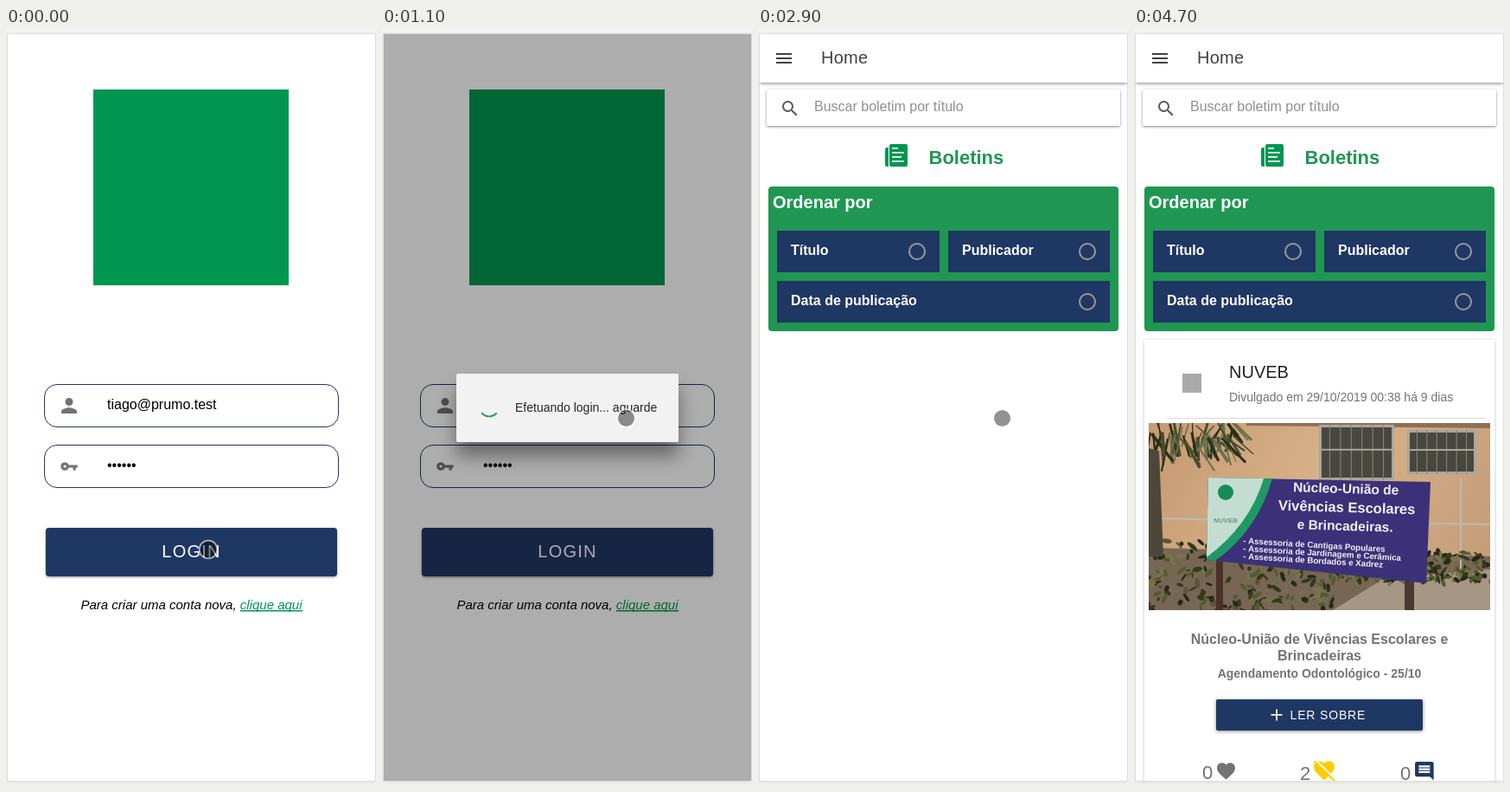
Animation, 428 px wide and 875 px high, one loop 5.9 s. Source, as an HTML page with a canvas:

```html
<!DOCTYPE html>
<html lang="pt">
<head>
<meta charset="utf-8">
<title>Login</title>
<style>
  html, body { margin: 0; width: 100%; height: 100%; overflow: hidden; background: #f4f4f4; }
  canvas { display: block; width: 428px; height: 875px; }
</style>
</head>
<body>
<canvas id="stage" width="428" height="875"></canvas>
<script>
const ctx = document.getElementById('stage').getContext('2d');
const LOOP = 5900, STEP = 100;
const NAVY = '#1f3763', GREEN = '#009650', PANEL = '#1f9752', GRAY = '#737373';
const SANS = '"Liberation Sans", Arial, sans-serif';

const ICONS = {
  person: 'M12 12a4.5 4.5 0 1 0 0-9 4.5 4.5 0 0 0 0 9zm0 2.25c-2.98 0-9 1.52-9 4.5V21h18v-2.25c0-2.98-6.02-4.5-9-4.5z',
  key: 'M11.68 10.5C11.02 8.62 9.1 7.13 6.98 7.13a4.8 4.8 0 0 0-4.73 4.87 4.86 4.86 0 0 0 4.83 4.87c2.11 0 3.94-1.49 4.6-3.37h4.82v3h3.24v-3h2.01v-3zM7.1 13.62a1.62 1.62 0 1 1 0-3.24 1.62 1.62 0 0 1 0 3.24z',
  menu: 'M3 6h18v2H3zM3 11h18v2H3zM3 16h18v2H3z',
  search: 'M15.5 14h-.79l-.28-.27A6.5 6.5 0 1 0 13.73 14.43l.27.28v.79l5 4.99L20.49 19zM9.5 14a4.5 4.5 0 1 1 0-9 4.5 4.5 0 0 1 0 9z',
  heart: 'M12 21.35l-1.45-1.32C5.4 15.36 2 12.28 2 8.5 2 5.42 4.42 3 7.5 3c1.74 0 3.41.81 4.5 2.09C13.09 3.81 14.76 3 16.5 3 19.58 3 22 5.42 22 8.5c0 3.78-3.4 6.86-8.55 11.54z',
  comment: 'M22 4c0-1.1-.9-2-2-2H4a2 2 0 0 0-2 2v12c0 1.1.9 2 2 2h14l4 4zM18 14H6v-2h12zM18 11H6V9h12zM18 8H6V6h12z'
};
for (const name in ICONS) ICONS[name] = new Path2D(ICONS[name]);

const clamp = v => Math.max(0, Math.min(1, v));
const smooth = v => (v = clamp(v), v * v * (3 - 2 * v));
const lerp = (a, b, k) => a + (b - a) * k;

function icon(name, x, y, scale, color) {
  ctx.save();
  ctx.translate(x, y);
  ctx.scale(scale, scale);
  ctx.fillStyle = color;
  ctx.fill(ICONS[name], 'evenodd');
  ctx.restore();
}

function text(str, x, y, size, color, { style = '', align = 'left', spacing = 0 } = {}) {
  ctx.font = `${style} ${size}px ${SANS}`;
  ctx.textAlign = align;
  ctx.letterSpacing = spacing + 'px';
  ctx.fillStyle = color;
  ctx.fillText(str, x, y);
}

// shadow: [offsetY, blur, alpha]; like a CSS shadow it never shows under the box itself
function box(x, y, w, h, r, color, shadow) {
  const shape = new Path2D();
  shape.roundRect(x, y, w, h, r);
  ctx.fillStyle = color;
  if (shadow) {
    const outside = new Path2D(shape);
    outside.rect(-100, -100, 700, 1100);
    ctx.save();
    ctx.clip(outside, 'evenodd');
    ctx.shadowOffsetY = shadow[0];
    ctx.shadowBlur = shadow[1];
    ctx.shadowColor = `rgba(0,0,0,${shadow[2]})`;
    ctx.fill(shape);
    ctx.restore();
  }
  ctx.fill(shape);
}

function poly(color, ...pts) {
  ctx.fillStyle = color;
  ctx.beginPath();
  for (let i = 0; i < pts.length; i += 2) ctx.lineTo(pts[i], pts[i + 1]);
  ctx.fill();
}

function line(color, width, x1, y1, x2, y2) {
  ctx.strokeStyle = color;
  ctx.lineWidth = width;
  ctx.beginPath();
  ctx.moveTo(x1, y1);
  ctx.lineTo(x2, y2);
  ctx.stroke();
}

function circle(x, y, r, fill, stroke, width) {
  ctx.beginPath();
  ctx.arc(x, y, r, 0, Math.PI * 2);
  if (fill) { ctx.fillStyle = fill; ctx.fill(); }
  if (stroke) { ctx.strokeStyle = stroke; ctx.lineWidth = width; ctx.stroke(); }
}

function page() {
  ctx.fillStyle = '#f4f4f4';
  ctx.fillRect(0, 0, 428, 875);
  box(1, 6, 427, 864, 1, '#dddddd', [1, 6, .1]);
  ctx.fillStyle = '#fff';
  ctx.fillRect(2, 7, 425, 862);
}

function field(y) {
  ctx.strokeStyle = NAVY;
  ctx.lineWidth = 1;
  ctx.beginPath();
  ctx.roundRect(44.5, y + .5, 340, 49, 14.5);
  ctx.stroke();
}

function loginButton(t) {
  const pressed = t >= 300 && t < 800;
  const fade = t > 500 ? clamp((800 - t) / 300) : 1;
  box(46, 577, 337, 56, 4, NAVY, pressed ? [1 + 2 * fade, 3 + 5 * fade, .45] : [1, 3, .45]);
  if (pressed) {
    ctx.save();
    ctx.beginPath();
    ctx.roundRect(46, 577, 337, 56, 4);
    ctx.clip();
    circle(Math.max(214.5, 232 - .15 * (t - 300)), 604, 95 + .69 * (t - 300), `rgba(255,255,255,${.155 * fade})`);
    ctx.restore();
  }
  text('LOGIN', 180.35, 611, 20, '#fff', { spacing: 1.2 });
}

function loginScreen(t) {
  box(101, 71, 226, 226, 0, GREEN);
  field(411);
  icon('person', 61, 424, 1, GRAY);
  text('tiago@prumo.test', 117, 440, 16, '#000');
  field(481);
  icon('key', 61, 494, 1, GRAY);
  text('••••••', 117, 510, 16, '#000');
  loginButton(t);
  text('Para criar uma conta nova, ', 86.5, 671, 15, '#000', { style: 'italic' });
  text('clique aqui', 270.8, 671, 15, GREEN, { style: 'italic' });
  ctx.fillRect(271, 672, 72, 1.5);
  if (t >= 300) loading(t);
}

function loading(t) {
  const shown = smooth((t - 205) / 280);
  ctx.fillStyle = `rgba(0,0,0,${.32 * shown})`;
  ctx.fillRect(2, 7, 425, 862);

  ctx.save();
  ctx.globalAlpha = shown;
  ctx.translate(214.5, 438.5);
  ctx.scale(1.1 - .1 * shown, 1.1 - .1 * shown);
  ctx.translate(-214.5, -438.5);
  box(86, 399, 257, 79, 2, '#f2f2f2', [16, 20, .4]);
  const start = (112 + .48 * (Math.min(t, 2400) - 500)) * Math.PI / 180;
  ctx.strokeStyle = '#1f9f5a';
  ctx.lineWidth = 1.9;
  ctx.beginPath();
  ctx.arc(124, 437, 11.4, start, start + 1.77);
  ctx.stroke();
  text('Efetuando login... aguarde', 154, 443, 14, '#262626');
  ctx.restore();
}

function option(label, x, y, w) {
  box(x, y, w, 48, 0, NAVY);
  text(label, x + 16, y + 28, 16, '#fff', { style: 'bold' });
  circle(x + w - 26, y + 24, 9, null, '#999', 2);
}

function paperIcon() {
  box(147, 138, 4, 22, [2, 0, 0, 2], GREEN);
  box(152, 134, 21, 26, 2, GREEN);
  [[139, 7], [144, 14], [149, 11], [154, 14]].forEach(([y, w]) => box(155, y - 1, w, 1.7, 0, '#fff'));
}

function homeScreen(t) {
  ctx.save();
  ctx.beginPath();
  ctx.rect(2, 7, 425, 862);
  ctx.clip();
  if (t >= 3300) card();
  box(2, 7, 425, 56, 0, '#fff', [1, 4, .5]);
  icon('menu', 18, 23, 1, '#424242');
  text('Home', 73, 41, 20, '#424242', { spacing: .25 });
  box(10, 71, 409, 42, 2, '#fff', [1, 3, .5]);
  icon('search', 25, 81, 1, '#5b5b5b');
  text('Buscar boletim por título', 65, 96, 16, '#8f8f8f');
  paperIcon();
  text('Boletins', 197.5, 157, 22, PANEL, { style: 'bold' });
  box(12, 183, 405, 167, 4, PANEL);
  text('Ordenar por', 17, 208, 20, '#fff', { style: 'bold' });
  option('Título', 22, 234, 188);
  option('Publicador', 220, 234, 187);
  option('Data de publicação', 22, 292, 385);
  if (t >= 3300 && t < 3900) box(421, 66, 3, 322, 1.5, `rgba(0,0,0,${t < 3600 ? .45 : .22})`);
  ctx.restore();
}

function card() {
  const bold = { style: 'bold', align: 'center' };
  box(12, 360, 405, 530, 3, '#fff', [1, 4, .25]);
  box(56, 399, 22, 22, 0, '#aaa');
  text('NUVEB', 110, 404, 20, '#222');
  text('Divulgado em 29/10/2019 00:38 há 9 dias', 110, 431, 14, GRAY);
  box(38, 450, 369, 1, 0, '#dadada');
  photo();
  text('Núcleo-União de Vivências Escolares e', 214.5, 711, 16, GRAY, bold);
  text('Brincadeiras', 214.5, 730, 16, GRAY, bold);
  text('Agendamento Odontológico - 25/10', 214.5, 750, 14, GRAY, bold);
  box(95, 775, 239, 36, 2, NAVY, [1, 4, .45]);
  box(158.5, 792, 13, 1.7, 0, '#fff');
  box(164.2, 786.4, 1.7, 13, 0, '#fff');
  text('LER SOBRE', 180.5, 798, 14, '#fff', { spacing: .84 });

  text('0', 79, 867, 22, GRAY);
  icon('heart', 93.9, 845.2, 1.05, GRAY);
  text('2', 192, 868, 22, GRAY);
  icon('heart', 205.6, 842.6, 1.2, '#ffcc00');
  line('#fff', 2.2, 210, 845, 235, 869);
  line('#ffcc00', 2, 208.5, 846.5, 232, 869);
  text('0', 308, 868, 22, GRAY);
  icon('comment', 322.9, 844.8, 1.08, NAVY);
}

function photo() {
  let seed = 7;
  const rnd = () => (seed = seed * 16807 % 2147483647) / 2147483647;
  ctx.save();
  ctx.beginPath();
  ctx.rect(17, 456, 395, 216);
  ctx.clip();

  const wall = ctx.createLinearGradient(17, 456, 412, 640);
  wall.addColorStop(0, '#c69a72');
  wall.addColorStop(.5, '#d9b28a');
  wall.addColorStop(1, '#c39b78');
  ctx.fillStyle = wall;
  ctx.fillRect(17, 456, 395, 216);
  poly('#8d7055', 130, 456, 412, 456, 412, 462, 130, 459);

  for (const [x, y, w, h] of [[214, 458, 87, 64], [316, 464, 80, 51]]) {
    box(x, y, w, h, 0, '#a9a69a');
    box(x + 3, y + 3, w - 6, h - 6, 0, '#48473f');
    for (let i = 1; i < 7; i++) line('#88877c', 1, x + i * w / 7, y, x + i * w / 7, y + h);
    line('#a9a69a', 2, x, y + h * .45, x + w, y + h * .45);
  }

  poly('#766653', 17, 600, 412, 610, 412, 672, 17, 672);
  poly('#a69784', 230, 672, 290, 635, 412, 625, 412, 672);
  line('#b9bbb1', 2, 17, 566, 412, 573);
  line('#b9bbb1', 2, 378, 520, 378, 625);

  for (let i = 0; i < 420; i++) {
    const x = 17 + rnd() * 395, edge = x < 90 ? 592 : x < 200 ? 617 : 605;
    const y = edge + rnd() * (x < 230 ? 80 : 34);
    ctx.fillStyle = ['#34381f', '#555a31', '#77744c', '#25291a'][i % 4];
    ctx.beginPath();
    ctx.ellipse(x, y, 2 + rnd() * 5, 1 + rnd() * 2, rnd() * 3, 0, Math.PI * 2);
    ctx.fill();
  }

  // Palm fronds
  for (let i = 0; i < 60; i++) {
    const x = 17 + rnd() * 100, y = 450 + rnd() * 30, reach = 25 + rnd() * 30;
    line(['#292f1b', '#474d2b', '#6d704b'][i % 3], 1 + rnd() * 3, x, y, x - 15 + rnd() * 45, y + reach * (1 - (x - 17) / 180));
  }
  poly('#4e4638', 17, 485, 29, 488, 34, 610, 17, 610);

  box(95, 610, 8, 62, 0, '#4a3029');
  box(313, 634, 11, 38, 0, '#4a3832');
  poly('#3c3178', 86, 519, 343, 524, 338, 641, 84, 614);
  ctx.beginPath();
  ctx.moveTo(86, 519);
  ctx.lineTo(160, 520);
  ctx.quadraticCurveTo(143, 580, 94, 615);
  ctx.lineTo(84, 614);
  ctx.fillStyle = '#1f9868';
  ctx.fill();
  ctx.beginPath();
  ctx.moveTo(86, 519);
  ctx.lineTo(150, 520);
  ctx.quadraticCurveTo(134, 574, 84, 611);
  ctx.fillStyle = '#c4ddd2';
  ctx.fill();
  circle(106, 536, 9, '#168a5b');
  text('NUVEB', 92, 571, 8, '#71968a', { style: 'bold' });
  signText('Núcleo-União de', 245, 537, 15.5, .03, 'center');
  signText('Vivências Escolares', 246, 559, 16.5, .03, 'center');
  signText('e Brincadeiras.', 244, 580, 15.5, .03, 'center');
  signText('- Assessoria de Cantigas Populares', 126, 595, 9.7, .06, 'left');
  signText('- Assessoria de Jardinagem e Cerâmica', 126, 604, 9.7, .06, 'left');
  signText('- Assessoria de Bordados e Xadrez', 126, 613, 9.7, .06, 'left');
  ctx.restore();
}

function signText(str, x, y, size, angle, align) {
  ctx.save();
  ctx.translate(x, y);
  ctx.rotate(angle);
  text(str, 0, 0, size, '#f2f0f5', { style: 'bold', align });
  ctx.restore();
}

// time, x, y
const TRAIL = [
  [0, 234, 602], [300, 234, 602], [400, 235, 601], [500, 279.5, 465.5], [600, 282.5, 450.5],
  [2000, 282.5, 450.5], [2200, 279, 457], [2400, 282.5, 450.5], [4000, 282.5, 450.5], [4600, 21.5, -7.5]
];

function pointer(t) {
  const next = TRAIL.findIndex(p => p[0] > t);
  const [t0, x0, y0] = TRAIL[next < 0 ? TRAIL.length - 1 : next - 1];
  const [t1, x1, y1] = next < 0 ? [t0 + 1, x0, y0] : TRAIL[next];
  const k = smooth((t - t0) / (t1 - t0));
  const x = lerp(x0, x1, k), y = lerp(y0, y1, k);
  circle(x, y, 9.6, 'rgba(0,0,0,.43)');
  circle(x, y, 10.4, null, 'rgba(255,255,255,.6)', 1.8);
}

function draw(now) {
  const t = Math.floor(now % LOOP / STEP) * STEP;
  page();
  if (t < 2900) loginScreen(t);
  else homeScreen(t);
  if (t < 4700) pointer(t);
}

const origin = performance.now();
function tick() {
  draw(performance.now() - origin);
  requestAnimationFrame(tick);
}
tick();
</script>
</body>
</html>
```
